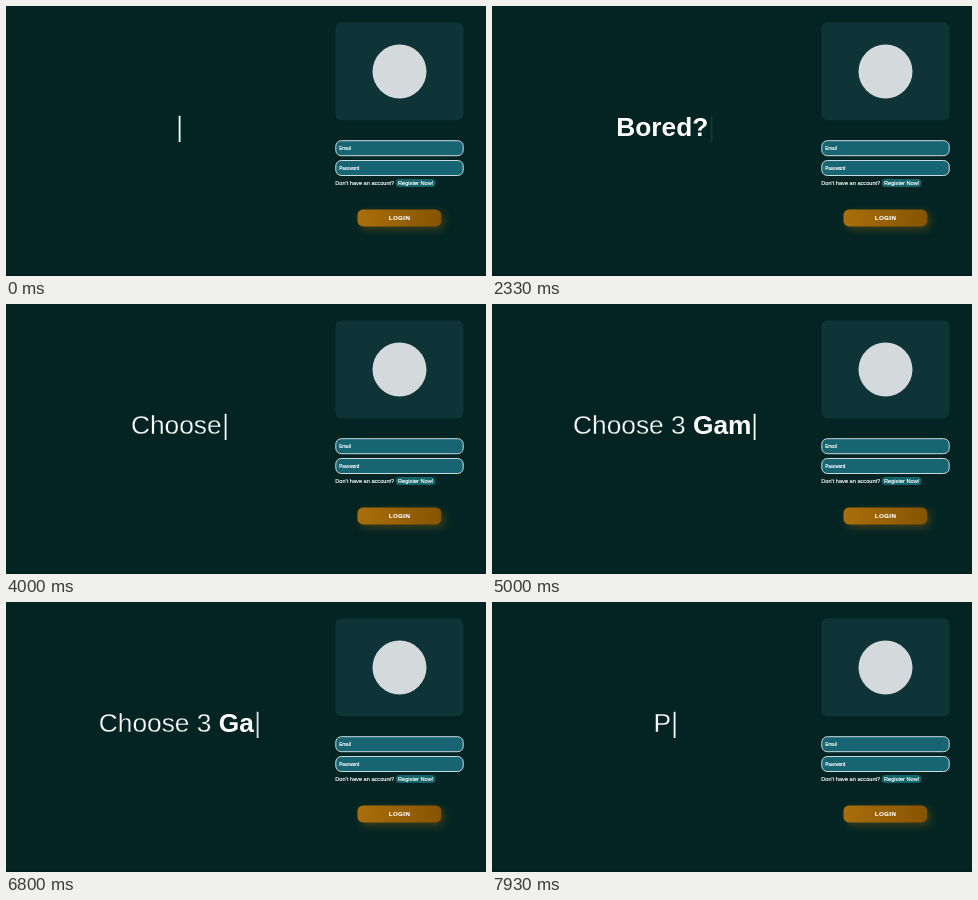
These frames come from a looping animation (480x270 px, 8000 ms). An HTML page:

```html
<!DOCTYPE html>
<html lang="en">
<head>
<meta charset="utf-8">
<title>Login</title>
<style>
  :root { --bg: #032423; }
  html, body { margin: 0; width: 100%; height: 100%; overflow: hidden; background: var(--bg); }
  #stage {
    position: absolute; left: 0; top: 0; width: 480px; height: 270px; overflow: hidden;
    background: var(--bg); color: #fff;
    font-family: "Liberation Sans", Arial, sans-serif;
  }
  svg { position: absolute; left: 0; top: 0; }
  .small { stroke: #fff; stroke-width: .16px; }
  .button { filter: drop-shadow(3.5px 3.5px 4px rgba(165, 107, 12, .38)); }
  .headline {
    position: absolute; left: 0; top: 106px; width: 347.4px; height: 30px;
    font-size: 26.3px; line-height: 30px; text-align: center; white-space: pre;
  }
  /* a background-coloured outline thins the strokes to a light weight */
  #light { -webkit-text-stroke: .3px var(--bg); }
  #caret { display: inline-block; width: 6.8px; height: 30px; vertical-align: top; }
  #caret svg { position: static; display: block; }
</style>
</head>
<body>
<div id="stage">
  <svg width="480" height="270" viewBox="0 0 480 270" fill="#fff">
    <defs>
      <linearGradient id="amber">
        <stop stop-color="#a96e0d"/>
        <stop offset="1" stop-color="#865400"/>
      </linearGradient>
    </defs>
    <rect y="268" width="480" height="2" fill="#031f20"/>
    <rect x="329.5" y="16.5" width="128" height="97.7" rx="6" fill="#0e3438"/>
    <circle cx="393.5" cy="65.5" r="27" fill="#d4dadb"/>
    <g fill="#176473" stroke="#c9dcdd">
      <rect x="329.8" y="134.7" width="127.4" height="15" rx="5.5"/>
      <rect x="329.8" y="154.5" width="127.4" height="15" rx="5.5"/>
    </g>
    <g class="small" font-size="4.6">
      <text x="333.2" y="143.7">Email</text>
      <text x="333.2" y="163.5">Password</text>
    </g>
    <rect x="389.8" y="173" width="39.6" height="8" rx="3.5" fill="#14646b"/>
    <g class="small" font-size="5.63">
      <text x="329.3" y="178.6">Don't have an account?</text>
      <text x="392" y="178.6">Register Now!</text>
    </g>
    <rect class="button" x="351.5" y="203.4" width="83.7" height="17" rx="5.5" fill="url(#amber)"/>
    <text class="small" x="393.5" y="213.9" font-size="6.2" font-weight="bold" letter-spacing=".4" text-anchor="middle">LOGIN</text>
  </svg>
  <div class="headline"><span id="light"></span><strong id="bold"></strong><span id="caret"><svg width="6.8" height="30"><rect x="2.7" y="3.8" width="1.8" height="26.2" fill="#fff"/></svg></span></div>
</div>
<script>
  const LOOP = 8000;
  const byId = id => document.getElementById(id);
  const light = byId('light'), bold = byId('bold'), caret = byId('caret');

  // Each run changes one character per step: dir 1 types, dir -1 deletes.
  const bored = { light: '', bold: 'Bored?' };
  const choose = { light: 'Choose 3 ', bold: 'Games' };
  const next = { light: 'P', bold: '' };
  const runs = [
    { phrase: bored, start: 120, step: 140, dir: 1, from: 0, count: 6 },
    { phrase: bored, start: 2500, step: 67, dir: -1, from: 6, count: 6 },
    { phrase: choose, start: 3240, step: 144, dir: 1, from: 0, count: 9 },
    { phrase: choose, start: 4640, step: 138, dir: 1, from: 9, count: 5 },
    { phrase: choose, start: 6642, step: 69, dir: -1, from: 14, count: 14 },
    { phrase: next, start: 7840, step: 140, dir: 1, from: 0, count: 1 }
  ];

  function showText(t) {
    const run = runs.filter(r => t >= r.start).pop();
    let length = 0;
    if (run) {
      const done = Math.min(run.count, 1 + Math.floor((t - run.start) / run.step));
      length = run.from + run.dir * done;
    }
    const { light: a, bold: b } = run ? run.phrase : bored;
    const textA = a.slice(0, length);
    const textB = b.slice(0, Math.max(0, length - a.length));
    if (light.textContent !== textA) light.textContent = textA;
    if (bold.textContent !== textB) bold.textContent = textB;
  }

  const blink = caret.animate(
    [1, 0, 1].map(opacity => ({ opacity, easing: 'ease' })),
    { duration: 1000, iterations: Infinity }
  );
  blink.pause();

  const begin = performance.now();
  function frame() {
    const t = (performance.now() - begin) % LOOP;
    showText(t);
    blink.currentTime = t;
    requestAnimationFrame(frame);
  }
  frame();
</script>
</body>
</html>
```
